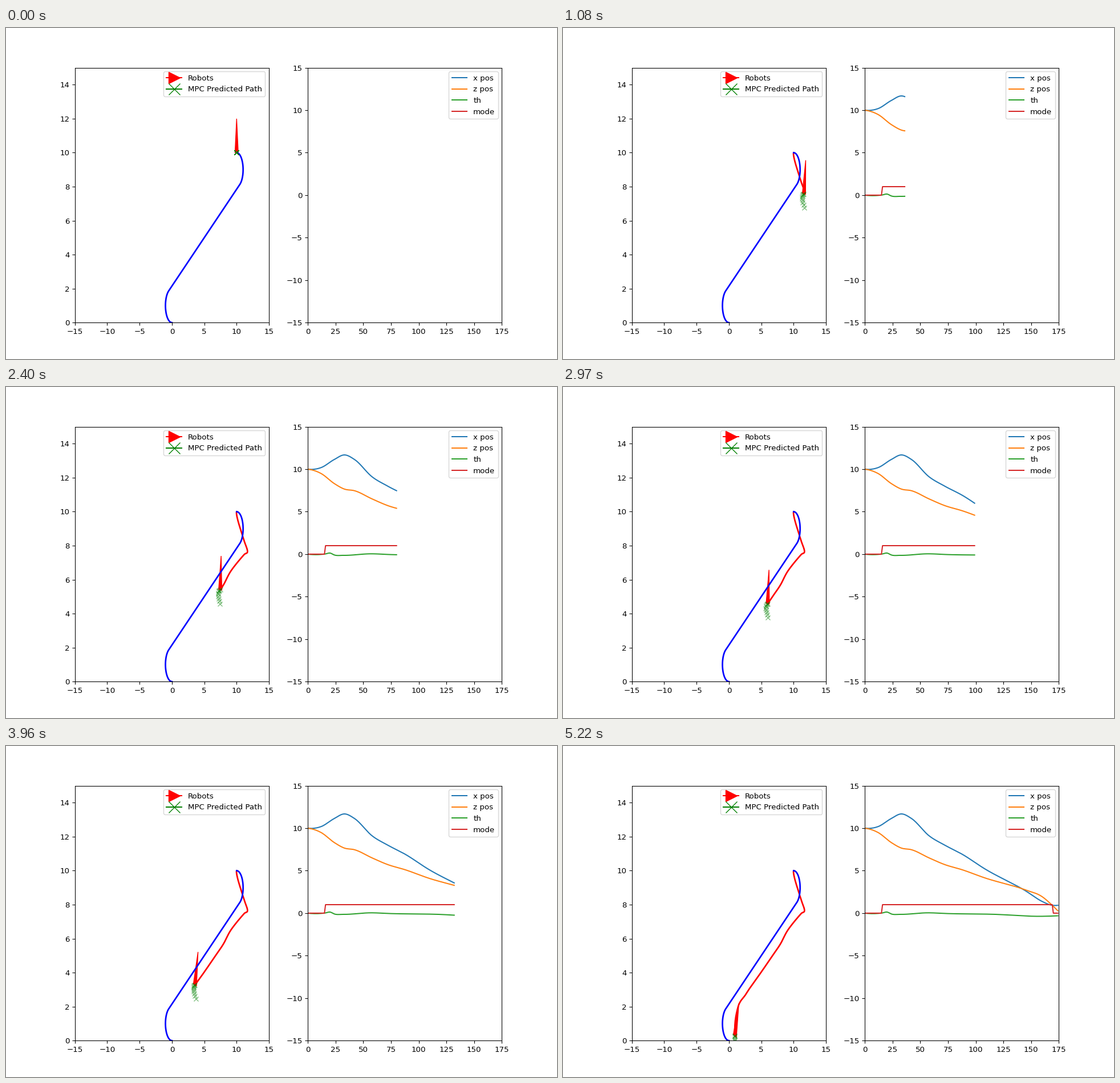
Recreate the animation shown at these times as a matplotlib script. Size 966 by 580 pixels, loop 5.25 s.

```python
import numpy as np
import matplotlib.pyplot as plt
from matplotlib.animation import FuncAnimation
from matplotlib.patches import Polygon

STEPS = 175
STEP = np.arange(STEPS)


def smooth(t, v):
    """Cubic Hermite curve through the points (t, v), one value per step."""
    t, v = np.asarray(t, float), np.asarray(v, float)
    m = np.gradient(v, t, edge_order=2)
    i = np.clip(np.searchsorted(t, STEP, side="right") - 1, 0, len(t) - 2)
    h = t[i + 1] - t[i]
    u = (STEP - t[i]) / h
    return ((1 + 2 * u) * (1 - u) ** 2 * v[i] + u * (1 - u) ** 2 * h * m[i]
            + u * u * (3 - 2 * u) * v[i + 1] + u * u * (u - 1) * h * m[i + 1])


# Key poses: the robot backs off, turns, then runs down along the plan
T = [0, 12, 24, 33, 42, 58, 72, 88, 108, 145, 160, 168, 174]
X = smooth(T, [10, 10.19, 11.15, 11.68, 11.15, 9.1, 8.01,
               6.92, 5.23, 2.62, 1.37, .95, .92])
Z = smooth(T, [10, 9.49, 8.3, 7.66, 7.47, 6.5, 5.72,
               5.1, 4.16, 2.73, 1.93, 1.05, .28])
TH = smooth([0, 16, 20, 24, 32, 57, 75, 115, 160, 174],
            [0, .03, .13, -.1, -.14, .04, -.05, -.13, -.37, -.31])
MODE = ((STEP >= 16) & (STEP < 170)).astype(float)

# How far ahead the prediction reaches: grows at the start and near the goal
REACH = .82 * np.clip(STEP / 16, 0, 1) + .45 * np.clip((STEP - 150) / 15, 0, 1)


def planned_path():
    """Two unit arcs joined by their inner tangent."""
    a = np.arctan2(8, 10) - np.arcsin(2 / np.hypot(10, 8)) - np.pi / 2
    first = np.linspace(np.pi / 2, a, 60)
    last = np.linspace(a + np.pi, 1.5 * np.pi, 60)
    return (np.r_[10 + np.cos(first), np.cos(last)],
            np.r_[9 + np.sin(first), 1 + np.sin(last)])


def robot_shape(i):
    c, s = np.cos(TH[i]), np.sin(TH[i])
    local = np.array([[-.25, 0], [.25, 0], [0, 2]])
    return local @ np.array([[c, s], [-s, c]]) + [X[i], Z[i]]


def prediction(i):
    u = np.linspace(0, 1, 10)
    bow = -.3 * np.sin(np.pi * u) - (.1 + .9 * TH[i]) * u
    return X[i] + MODE[i] * bow, Z[i] - REACH[i] * u ** 1.9


# 96.6 dpi gives a 966 x 580 pixel canvas
fig, (left, right) = plt.subplots(1, 2, figsize=(10, 6.0042), dpi=96.6)

left.set(xlim=(-15, 15), ylim=(0, 15), xticks=range(-15, 16, 5),
         yticks=range(0, 15, 2))
left.plot([], [], "r->", ms=15, label="Robots")
left.plot([], [], "g-x", ms=15, label="MPC Predicted Path")
trail, = left.plot([], [], "r", lw=2)
left.plot(*planned_path(), "b", lw=2)
ahead, = left.plot([], [], "gx", ms=6, alpha=.5)
robot = left.add_patch(Polygon(robot_shape(0), fc="r", ec="r", lw=1))
left.legend(loc="upper right")

right.set(xlim=(0, 175), ylim=(-15, 15), xticks=range(0, 176, 25),
          yticks=range(-15, 16, 5))
series = [(right.plot([], [], label=name)[0], data) for name, data in
          (("x pos", X), ("z pos", Z), ("th", TH), ("mode", MODE))]
right.legend(loc="upper right")


def draw(i):
    n = i + 1
    trail.set_data(X[:n], Z[:n])
    ahead.set_data(*prediction(i))
    robot.set_xy(robot_shape(i))
    for line, data in series:
        line.set_data(STEP[:n], data[:n])
    return [trail, ahead, robot] + [line for line, _ in series]


anim = FuncAnimation(fig, draw, frames=STEPS, interval=30, repeat=True,
                     repeat_delay=0)
plt.show()
```
